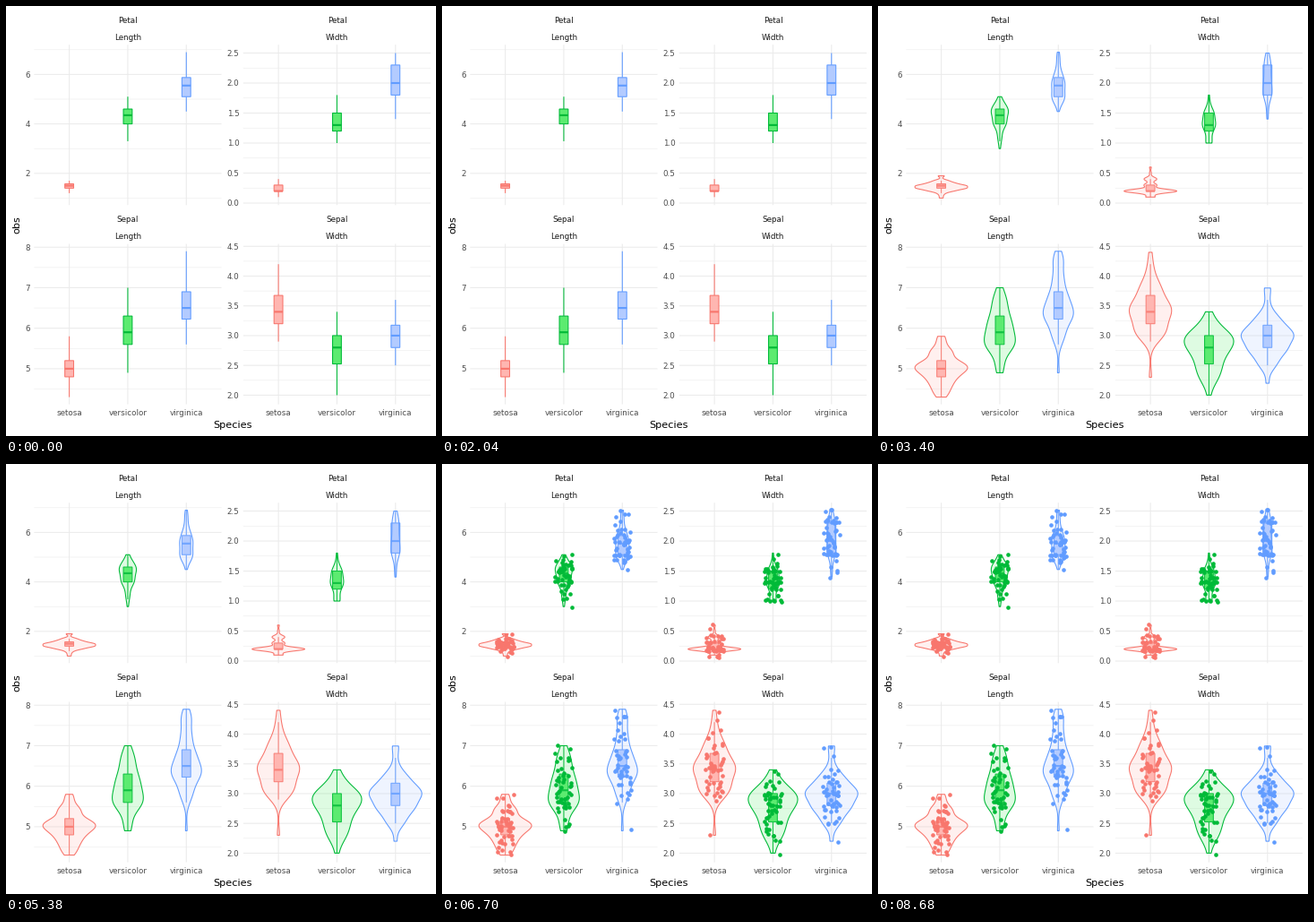
A matplotlib script that plays this animation: 480x480 px, repeating every 10000 ms.

```python
import matplotlib.pyplot as plt
import numpy as np
from matplotlib.animation import FuncAnimation
from matplotlib.colors import to_rgba

SIZE = 480
DPI = 80
PX = 72 / DPI          # points per pixel
STEP = 65.34           # distance between species
FRAMES, INTERVAL = 100, 100
VIOLIN_AT, DOTS_AT = 34, 67

SPECIES = ["setosa", "versicolor", "virginica"]
LINE = ["#F8766D", "#00BA38", "#619CFF"]
FILL = ["#FFB6B1", "#5CEB70", "#B3CBFF"]

plt.rcParams.update({"font.family": "DejaVu Sans", "path.snap": False})
rng = np.random.default_rng(7)

fig = plt.figure(figsize=(SIZE / DPI, SIZE / DPI), dpi=DPI, facecolor="white")
ax = fig.add_axes([0, 0, 1, 1])
ax.set_xlim(0, SIZE)
ax.set_ylim(SIZE, 0)
ax.axis("off")

violins, dots = [], []


def text(x, y, s, size=8.8, color="#1A1A1A", **kw):
    ax.text(x, y, s, fontsize=size * PX, color=color, va="baseline", **kw)


def line(xs, ys, color, width=1.07, z=1):
    ax.plot(xs, ys, color=color, lw=width * PX, zorder=z,
            solid_capstyle="butt")


def sample(start, counts):
    """Expand counts per 0.1 step into single observations."""
    return np.repeat(start + 0.1 * np.arange(len(counts)), counts)


def density(v):
    """Gaussian kernel density over the range of the data."""
    q1, q3 = np.percentile(v, [25, 75])
    bw = 0.9 * min(v.std(ddof=1), (q3 - q1) / 1.34) * len(v) ** -0.2
    grid = np.linspace(v.min(), v.max(), 256)
    kernel = np.exp(-0.5 * ((grid[:, None] - v) / bw) ** 2)
    return grid, kernel.mean(axis=1) / (bw * np.sqrt(2 * np.pi))


def draw_box(x, v, to_y, color, fill):
    q1, mid, q3 = np.percentile(v, [25, 50, 75])
    reach = 1.5 * (q3 - q1) + 1e-9
    inside = v[(v >= q1 - reach) & (v <= q3 + reach)]
    half = 0.075 * STEP
    line([x, x], [to_y(inside.max()), to_y(q3)], color, z=3)
    line([x, x], [to_y(q1), to_y(inside.min())], color, z=3)
    ax.fill([x - half, x + half, x + half, x - half],
            to_y(np.array([q1, q1, q3, q3])),
            fc=fill, ec=color, lw=1.07 * PX, zorder=3)
    line([x - half, x + half], [to_y(mid)] * 2, color, 2.13, z=4)


def draw_violin(x, grid, half, to_y, color, fill):
    xs = np.concatenate([x - half, x + half[::-1]])
    ys = to_y(np.concatenate([grid, grid[::-1]]))
    violins.extend(ax.fill(xs, ys, fc=to_rgba(fill, 0.2), ec=color,
                           lw=1.07 * PX, zorder=5))


def draw_dots(x, v, to_y, color):
    dx = rng.uniform(-0.15, 0.15, len(v)) * STEP
    dy = rng.uniform(-0.04, 0.04, len(v))
    dots.append(ax.scatter(x + dx, to_y(v + dy), s=(4.6 * PX) ** 2,
                           color=color, linewidths=0, zorder=6))


def panel(left, top, titles, zero, unit, major, minor, fmt, groups):
    """One facet; a value v sits at height zero - unit * v."""
    def to_y(v):
        return zero - unit * v

    right, bottom = left + 3.2 * STEP, top + 179
    centers = left + STEP * (0.6 + np.arange(3))
    for v in minor:
        line([left, right], [to_y(v)] * 2, "#EBEBEB", 0.53)
    for v in major:
        line([left, right], [to_y(v)] * 2, "#EBEBEB")
        text(left - 4.3, to_y(v) + 3.4, fmt % v, color="#4D4D4D", ha="right")
    for x in centers:
        line([x, x], [top, bottom], "#EBEBEB", z=2)

    text(centers[1], top - 24.2, titles[0], ha="center")
    text(centers[1], top - 5.6, titles[1], ha="center")

    samples = [sample(*g) for g in groups]
    curves = [density(v) for v in samples]
    peak = max(d.max() for _, d in curves)
    for x, v, (grid, d), color, fill in zip(centers, samples, curves,
                                            LINE, FILL):
        draw_box(x, v, to_y, color, fill)
        draw_violin(x, grid, 0.45 * STEP * d / peak, to_y, color, fill)
        draw_dots(x, v, to_y, color)
    return centers


LEFT, RIGHT, TOP, LOW = 31.4, 264.9, 43.2, 265.6

panel(LEFT, TOP, ("Petal", "Length"), 242.0, 27.6,
      [2, 4, 6], [1, 3, 5, 7], "%d", [
          (1.0, [1, 1, 2, 7, 13, 13, 7, 4, 0, 2]),
          (3.0, [1, 0, 0, 2, 0, 2, 1, 1, 1, 3, 5,
                 3, 4, 2, 4, 7, 3, 5, 2, 2, 1, 1]),
          (4.5, [1, 0, 0, 2, 3, 3, 7, 2, 2, 2, 3, 6, 3,
                 3, 2, 2, 3, 0, 1, 1, 0, 1, 2, 0, 1])])

panel(RIGHT, TOP, ("Petal", "Width"), 220.0, 67.0,
      np.arange(0, 2.6, 0.5), np.arange(0.25, 2.5, 0.5), "%.1f", [
          (0.1, [5, 29, 7, 7, 1, 1]),
          (1.0, [7, 3, 5, 13, 7, 10, 3, 1, 1]),
          (1.4, [1, 2, 1, 1, 11, 5, 6, 6, 3, 8, 3, 3])])

columns = panel(LEFT, LOW, ("Sepal", "Length"), 631.0, 45.22,
                [5, 6, 7, 8], [4.5, 5.5, 6.5, 7.5], "%d", [
    (4.3, [1, 3, 1, 4, 2, 5, 4, 8, 8, 3, 1, 5, 2, 0, 2, 1]),
    (4.9, [1, 2, 1, 1, 0, 1, 5, 5, 5, 3, 2, 4, 4, 2, 3, 2, 1, 2, 3, 1, 1, 1]),
    (4.9, [1, 0, 0, 0, 0, 0, 0, 1, 1, 3, 1, 2, 2, 2, 6, 5, 4, 0, 5, 2, 3,
           0, 1, 3, 1, 1, 0, 1, 4, 0, 1])])

columns = [*columns, *panel(RIGHT, LOW, ("Sepal", "Width"), 567.3, 66.45,
                            np.arange(2, 4.6, 0.5), np.arange(2.25, 4.5, 0.5),
                            "%.1f", [
    (2.3, [1, 0, 0, 0, 0, 0, 1, 6, 4, 5, 2, 9, 6, 3, 3, 4, 2, 1, 1, 1, 0, 1]),
    (2.0, [1, 0, 2, 3, 3, 4, 3, 5, 6, 7, 8, 3, 3, 1, 1]),
    (2.2, [1, 0, 0, 4, 2, 4, 8, 2, 12, 4, 5, 3, 2, 0, 1, 0, 2])])]

for x, name in zip(columns, SPECIES * 2):
    text(x, 457, name, color="#4D4D4D", ha="center")
text(252.6, 471, "Species", 11.3, "black", ha="center")
text(15.3, 243.7, "obs", 11.3, "black", ha="center",
     rotation=90, rotation_mode="anchor")


def update(i):
    for v in violins:
        v.set_visible(i >= VIOLIN_AT)
    for d in dots:
        d.set_visible(i >= DOTS_AT)
    return violins + dots


anim = FuncAnimation(fig, update, frames=FRAMES, interval=INTERVAL,
                     init_func=lambda: update(0), repeat=True, repeat_delay=0)
plt.show()
```
